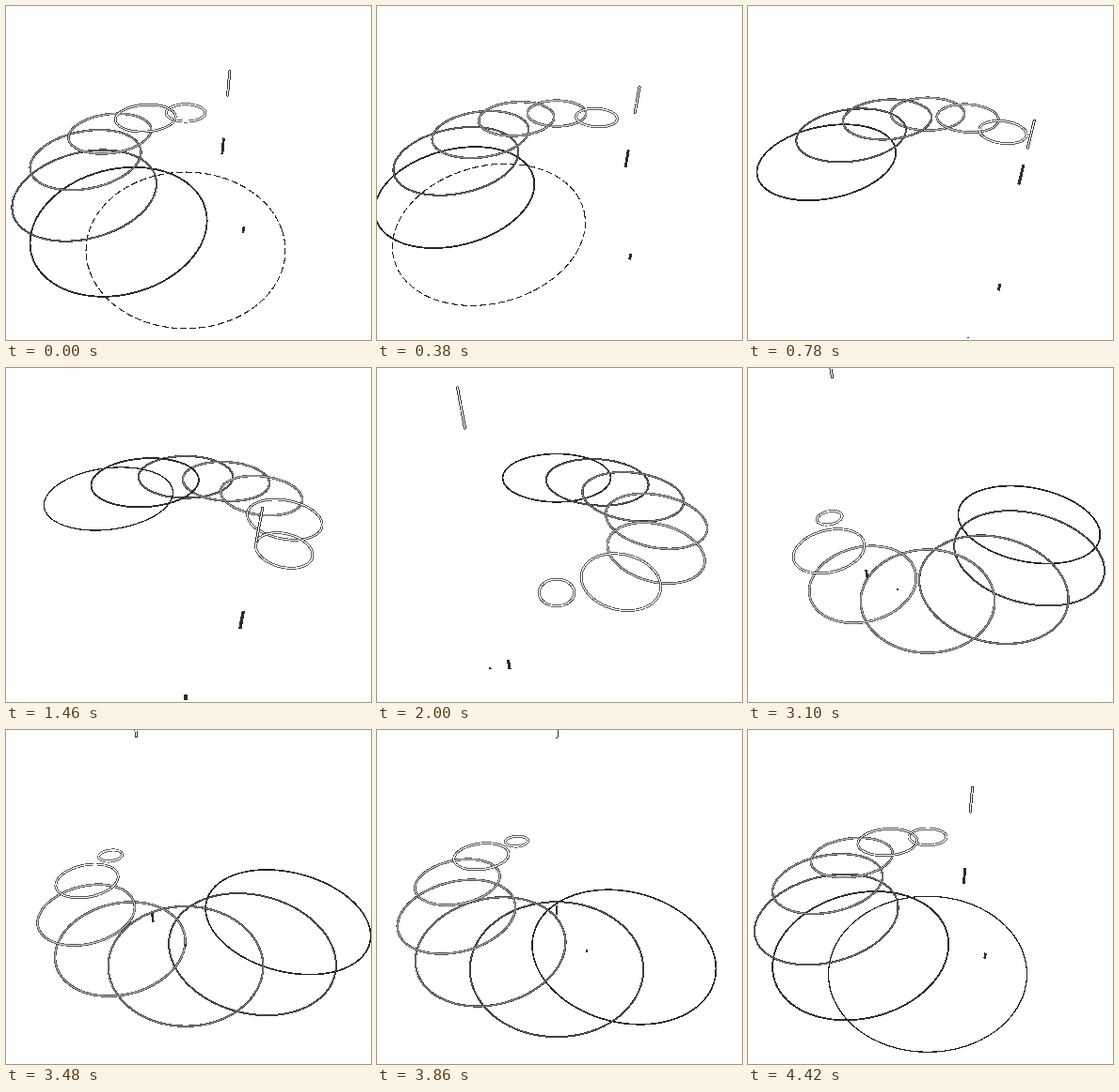
An HTML page for the animation above (4440 ms loop, 388x356 px).

```html
<!DOCTYPE html>
<html lang="en">
<head>
<meta charset="utf-8">
<title>Rain ring</title>
<style>
html, body { margin: 0; width: 100%; height: 100%; overflow: hidden; background: #fff; }
svg { display: block; width: 100vw; height: 100vh; }
path { fill: none; stroke-linejoin: round; shape-rendering: crispEdges; }
</style>
</head>
<body>
<svg id="stage" viewBox="0 0 388 356"></svg>
<script>
const LOOP = 4440, COUNT = 12, STEP = LOOP / COUNT;
const FALL = 1110;                       // drop is released this long before its slot
const RIPPLE_START = -305, RIPPLE_END = 2232;
const CX = 191, HORIZON = -60.5, TILT = 2.11, VANISH = 590;
const INK = '#333', DARK = '#2b2b30';

const stage = document.getElementById('stage');

function addPath(color, cap) {
  const p = document.createElementNS('http://www.w3.org/2000/svg', 'path');
  p.setAttribute('stroke', color);
  if (cap) p.setAttribute('stroke-linecap', cap);
  stage.appendChild(p);
  return p;
}

function show(path, d, width) {
  path.setAttribute('d', width > 0 ? d : '');
  path.setAttribute('stroke-width', Math.max(0, width).toFixed(2));
}

// Perspective: scale of a point at depth d and height h
const scale = (d, h) => 1 / (0.00959 + 0.00254 * d - 0.00202 * h);

function project(x, d, h) {
  const s = scale(d, h), ground = scale(d, 0);
  const y = HORIZON + TILT * ground;
  return (CX + x * s).toFixed(2) + ' ' + (VANISH + (y - VANISH) * s / ground).toFixed(2);
}

function ringPath(x, d, r) {
  const pts = [];
  for (let i = 0; i < 96; i++) {
    const a = i / 48 * Math.PI;
    pts.push(project(x + r * Math.cos(a), d + r * Math.sin(a), 0));
  }
  return 'M' + pts.join('L') + 'Z';
}

const slots = Array.from({ length: COUNT }, (_, k) => {
  const a = k * 2 * Math.PI / COUNT;
  return { k, x: Math.sin(a), d: Math.cos(a) };
});
for (const s of slots) { s.ring = addPath(INK); s.core = addPath('#fff'); }
for (const s of slots) {
  s.mirror = addPath(DARK);
  s.drop = addPath(INK, 'round');
  s.shine = addPath('#fff', 'round');
}

function drawRipple(s, t) {
  if (t < RIPPLE_START || t > RIPPLE_END) {
    show(s.ring, '', 0);
    show(s.core, '', 0);
    return;
  }
  const r = Math.sqrt(0.000206 * (t - RIPPLE_START));
  const left = (RIPPLE_END - t) / (RIPPLE_END - RIPPLE_START);
  const gap = 2.1 * Math.sqrt(left);     // the two outlines close up with age
  const d = ringPath(s.x, s.d, r);
  show(s.ring, d, 1 + gap);
  s.ring.setAttribute('stroke', `hsl(240 4% ${(12 + 26 * left).toFixed(1)}%)`);
  s.ring.setAttribute('stroke-dasharray', t > 2210 ? '7 3' : 'none');
  show(s.core, d, gap - 0.8);
}

function drawDrop(s, t) {
  const age = t + FALL;
  const mid = 2 - 2.9e-6 * age * age, half = 0.000195 * age;
  const line = (side, size) => {
    const lo = Math.max(0, mid - size), hi = mid + size;
    return age > 10 && hi > lo
      ? 'M' + project(s.x, s.d, side * lo) + 'L' + project(s.x, s.d, side * hi) : '';
  };
  show(s.mirror, line(-1, half * 0.87), 1.5 + 0.016 * scale(s.d, -mid));
  const d = line(1, half * 0.95);
  show(s.drop, d, 3);
  show(s.shine, d, 1.1);
}

function render(time) {
  for (const s of slots) {
    const t = (time - s.k * STEP + FALL + LOOP) % LOOP - FALL;
    drawRipple(s, t);
    drawDrop(s, t);
  }
}

let start = null;
function tick(now) {
  if (start === null) start = now;
  render((now - start) % LOOP);
  requestAnimationFrame(tick);
}
render(0);
requestAnimationFrame(tick);
</script>
</body>
</html>
```
